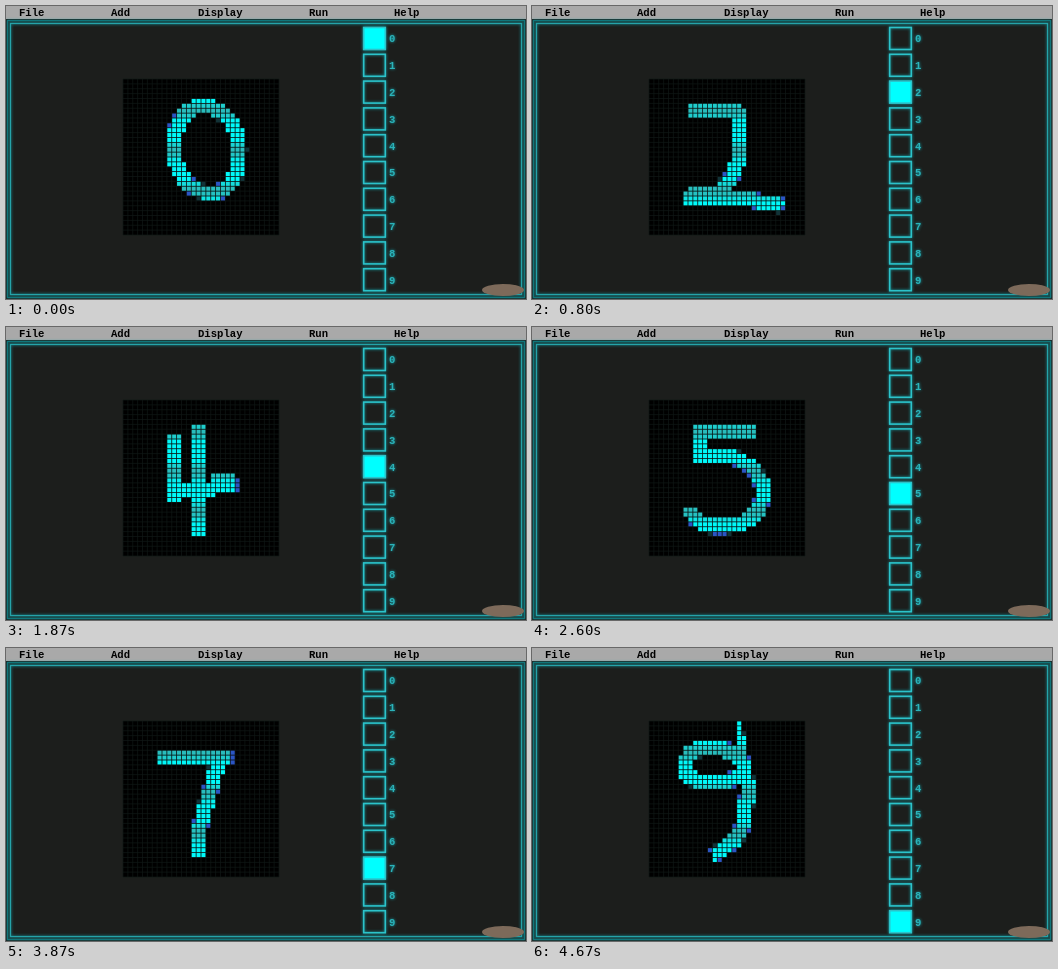
Animation of 520x293 px, one loop 4.74 s. Source, as an HTML page:

```html
<!DOCTYPE html>
<html lang="en">
<head>
<meta charset="utf-8">
<title>Digit classifier</title>
<style>
  html, body { margin: 0; width: 100%; height: 100%; overflow: hidden; background: #1c1e1c; }
  svg { display: block; width: 100%; height: 100%; }
  text { font: bold 10.6px "Liberation Mono", "DejaVu Sans Mono", monospace; }
  .glow { filter: drop-shadow(0 0 1.5px #12a5ad); }
</style>
</head>
<body>
<svg id="stage" viewBox="0 0 520 293" xmlns="http://www.w3.org/2000/svg">
  <rect width="520" height="293" fill="#1c1e1c"/>
  <rect width="520" height="13" fill="#a9a9a9"/>
  <g id="menu"></g>
  <g class="glow" fill="none">
    <rect x="1.5" y="14.5" width="517" height="277" stroke="#11767b"/>
    <rect x="4.5" y="17.5" width="511" height="271" stroke="#25a3a9" stroke-width="1.2"/>
  </g>
  <rect x="117" y="73" width="156" height="156"/>
  <path id="grid" stroke="#101716" stroke-width=".7"/>
  <g id="digits"></g>
  <g id="outputs"></g>
  <ellipse cx="497" cy="284" rx="21" ry="6" fill="#7d6a5a"/>
</svg>
<script>
const LOOP = 4740, STEP = 525, LEAD = 265;
const CELLS = 32, SIZE = 156 / CELLS, LEFT = 117, TOP = 73;

// Handwritten strokes in grid units, pen width 3
const STROKES = [
  "M16.3 5.6C20 5.6 23.9 9 23.9 14.5C23.9 20.5 22 23.4 18 23.4C14 23.4 10.4 20 10.4 14C10.4 8.5 13 5.6 16.3 5.6Z",
  "M17.5 5L15.5 15V27.5",
  "M8 6.5H17Q18.5 6.5 18.5 8.5V16Q18 20 15 22.5M8 23.2H17M7 24.3H18L27.5 25.9",
  "M9 7.5C14 5.5 20 6 20 10C20 13.5 16 15 12 15C18 15 21.5 17 21.5 21C21.5 26 14 27 9 25.5",
  "M10.5 7V20.4M15.5 5V27.7M9 18.5H19M18.4 16.5H23M18 17.5H23.4",
  "M21.6 6.5H10.5V11.5H15C20 11.5 23.4 15 23.4 19C23.4 24 20 25.9 15 26C11 26 8.5 25 8.5 22",
  "M19 6.5H16C11 8.5 7.8 13 7.5 17.5C7.3 22 10 24.2 14.5 24.2C19 24.2 20.5 22 20.5 18.5C20.5 15.5 18 14 14 14C11 14 9 15 8 17",
  "M7 7.6H22.4M20 7L17.4 16L15.5 23V27.7",
  "M15.5 14.5C11 12.5 10 10.5 10.5 8.5C11.5 5 20 5 20.5 9C20.5 12 10 17 10 22C10.5 27 20.5 27 20.5 21.5C20.5 18 19 16 15.5 14.5",
  "M19.5 10C19 7 16 5.6 12.5 5.6C9 5.6 7.5 7.5 7.5 9.5C7.5 12 10 12.8 13 12.8C16 12.8 19.5 11.5 19.5 10L20.4 14L19.5 19.5C19.3 23 17 26 13 27.6"
];

const byId = id => document.getElementById(id);

function add(parent, tag, attrs, text = "") {
  const el = document.createElementNS("http://www.w3.org/2000/svg", tag);
  for (const key in attrs) el.setAttribute(key, attrs[key]);
  el.textContent = text;
  return parent.appendChild(el);
}

// Coverage of a stroke in each grid cell, 0 to 1
function raster(path) {
  const canvas = document.createElement("canvas");
  canvas.width = canvas.height = CELLS;
  const ctx = canvas.getContext("2d");
  ctx.lineWidth = 3;
  ctx.stroke(new Path2D(path));
  const { data } = ctx.getImageData(0, 0, CELLS, CELLS);
  return Array.from({ length: CELLS * CELLS }, (_, i) => data[i * 4 + 3] / 255);
}

function cellColor(level, row) {
  if (level < .3) return null;
  if (level < .37) return "#123338";
  if (level < .48) return "#2b55c4";
  const band = Math.max(0, Math.cos((row - 6) / 8.2 * 2 * Math.PI));
  return `hsl(180 ${100 - 36 * band}% ${49 - 4 * band}%)`;
}

function drawDigit(path) {
  const group = add(byId("digits"), "g", { visibility: "hidden" });
  raster(path).forEach((level, i) => {
    const col = i % CELLS, row = Math.floor(i / CELLS);
    const fill = cellColor(level, row);
    if (fill) add(group, "rect", {
      x: LEFT + col * SIZE + .4, y: TOP + row * SIZE + .4,
      width: SIZE - .8, height: SIZE - .8, fill
    });
  });
  return group;
}

function drawOutput(n) {
  const y = 32.5 + n * 26.8;
  const g = add(byId("outputs"), "g", { class: "glow" });
  add(g, "text", { x: 383, y: y + 3.8, fill: "#2bb3ba" }, n);
  return add(g, "rect", {
    x: 357.7, y: y - 11, width: 21.6, height: 22,
    fill: "none", stroke: "#2cc3ca", "stroke-width": 1.6
  });
}

Object.entries({ File: 13, Add: 105, Display: 192, Run: 303, Help: 388 })
  .forEach(([label, x]) => add(byId("menu"), "text", { x, y: 9.6 }, label));

let lines = "";
for (let i = 0; i <= CELLS; i++) {
  const d = i * SIZE;
  lines += `M${LEFT + d} ${TOP}v156M${LEFT} ${TOP + d}h156`;
}
byId("grid").setAttribute("d", lines);

const digits = STROKES.map(drawDigit);
const outputs = STROKES.map((_, n) => drawOutput(n));
const start = performance.now();
let shown = -1;

function show(n) {
  if (n === shown) return;
  shown = n;
  digits.forEach((g, i) => g.setAttribute("visibility", i === n ? "visible" : "hidden"));
  outputs.forEach((box, i) => box.setAttribute("fill", i === n ? "#00ffff" : "none"));
}

function tick() {
  const t = (performance.now() - start) % LOOP;
  show(Math.min(9, Math.floor((t + LEAD) / STEP)));
  requestAnimationFrame(tick);
}
tick();
</script>
</body>
</html>
```
